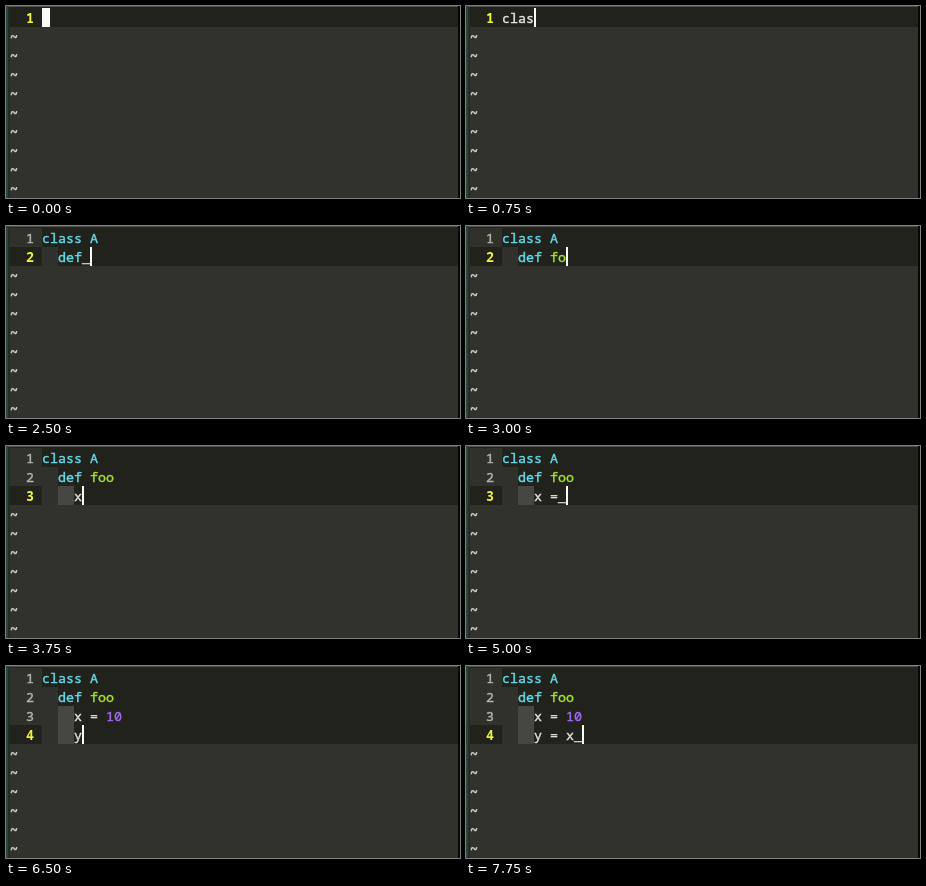
Animation of 454 by 192 pixels, one loop 8 s. Source, as an HTML page:

```html
<!DOCTYPE html>
<html lang="en">
<head>
<meta charset="utf-8">
<title>Typing a class</title>
<style>
  html, body { margin: 0; width: 100%; height: 100%; overflow: hidden; background: #31322c; }
  #stage {
    position: absolute; left: 0; top: 0; width: 454px; height: 192px; overflow: hidden;
    background: #31322c; color: #e6e6e0;
    font: 400 13.333px/21px "Noto Sans Mono", "DejaVu Sans Mono", monospace;
    font-variant-ligatures: none;
    -webkit-text-stroke: 0.4px;
  }
  #rows { position: absolute; left: 0; top: 2px; width: 454px; }
  .row { position: relative; height: 19px; white-space: pre; }
  .line { background: #21221c; }
  .row > * { position: absolute; top: 0; height: 19px; }
  .num { left: 4px; width: 24px; padding-right: 8px; text-align: right; color: #b4b5ae; background: #30312b; }
  .now .num { color: #f0f53c; background: none; font-weight: 700; -webkit-text-stroke: 0; }
  .code { left: 36px; }
  .tilde { left: 4px; color: #d0d3cc; font-weight: 700; }
  .guide { width: 16px; }
  .g0 { left: 36px; background: #30312c; }
  .g1 { left: 52px; background: #464742; }
  .cursor { background: #fafaf6; }
  .key { color: #66d9e8; }
  .fn { color: #a6e22e; }
  .int { color: #a06cf0; }
  .trail { color: #d0d1ca; }
  .edge { position: absolute; }
</style>
</head>
<body>
<div id="stage">
  <div class="edge" style="left:0;top:0;width:454px;height:2px;background:#21221c"></div>
  <div id="rows"></div>
  <div class="edge" style="left:0;top:0;width:454px;height:1px;background:#50514d"></div>
  <div class="edge" style="left:0;top:0;width:2px;height:192px;background:#294640"></div>
  <div class="edge" style="left:2px;top:1px;width:2px;height:191px;background:#272a25"></div>
  <div class="edge" style="left:452px;top:0;width:2px;height:192px;background:#060706"></div>
</div>
<script>
const STEP = 250, LOOP = 8000, CELL = 8, LEFT = 36, ROWS = 10;

// [start time, line being typed, its text so far]
const edits = [
  [0, 0, ""], [500, 0, "cl"], [750, 0, "clas"], [1000, 0, "class"],
  [1250, 0, "class "], [1500, 0, "class A"],
  [1750, 1, "  "], [2000, 1, "  d"], [2250, 1, "  def"], [2500, 1, "  def "],
  [2750, 1, "  def f"], [3000, 1, "  def fo"], [3250, 1, "  def foo"],
  [3500, 2, "    "], [3750, 2, "    x"], [4250, 2, "    x "],
  [4750, 2, "    x ="], [5000, 2, "    x = "],
  [5250, 2, "    x = 1"], [5500, 2, "    x = 10"],
  [6000, 3, "    "], [6500, 3, "    y"], [6750, 3, "    y "],
  [7000, 3, "    y ="], [7250, 3, "    y = "], [7500, 3, "    y = x"],
  [7750, 3, "    y = x "]
];

const rows = document.getElementById("rows");
const span = (cls, text) => `<span class="${cls}">${text}</span>`;

function colour(text) {
  const body = text.trimEnd();
  const marked = body
    .replace(/^class( A)?$/, m => span("key", m))
    .replace(/^( *)def( \w+)?$/, (m, pad, name) =>
      pad + span("key", "def") + (name ? span("fn", name) : ""))
    .replace(/= (\d+)$/, (m, n) => "= " + span("int", n));
  return marked + span("trail", "_".repeat(text.length - body.length));
}

function lineRow(text, i, current, inserting) {
  const depth = text.match(/^ */)[0].length / 2;
  let html = `<span class="num">${i + 1}</span>`;
  for (let g = 0; g < depth; g++) html += `<i class="guide g${g}"></i>`;
  html += `<span class="code">${colour(text)}</span>`;
  if (current) {
    const x = LEFT + text.length * CELL;
    html += `<i class="cursor" style="left:${x}px;width:${inserting ? 2 : CELL}px"></i>`;
  }
  return `<div class="row line${current ? " now" : ""}">${html}</div>`;
}

function draw(time) {
  const lines = [];
  let active = 0;
  for (const [start, line, text] of edits) {
    if (start > time) break;
    lines[line] = text;
    active = line;
  }
  let html = lines.map((text, i) => lineRow(text, i, i === active, time >= STEP)).join("");
  for (let i = lines.length; i < ROWS; i++) {
    html += '<div class="row"><span class="tilde">~</span></div>';
  }
  rows.innerHTML = html;
}

let shown = 0;
const origin = performance.now();
function tick() {
  const time = Math.floor(((performance.now() - origin) % LOOP) / STEP) * STEP;
  if (time !== shown) draw(shown = time);
  requestAnimationFrame(tick);
}
draw(0);
requestAnimationFrame(tick);
</script>
</body>
</html>
```
